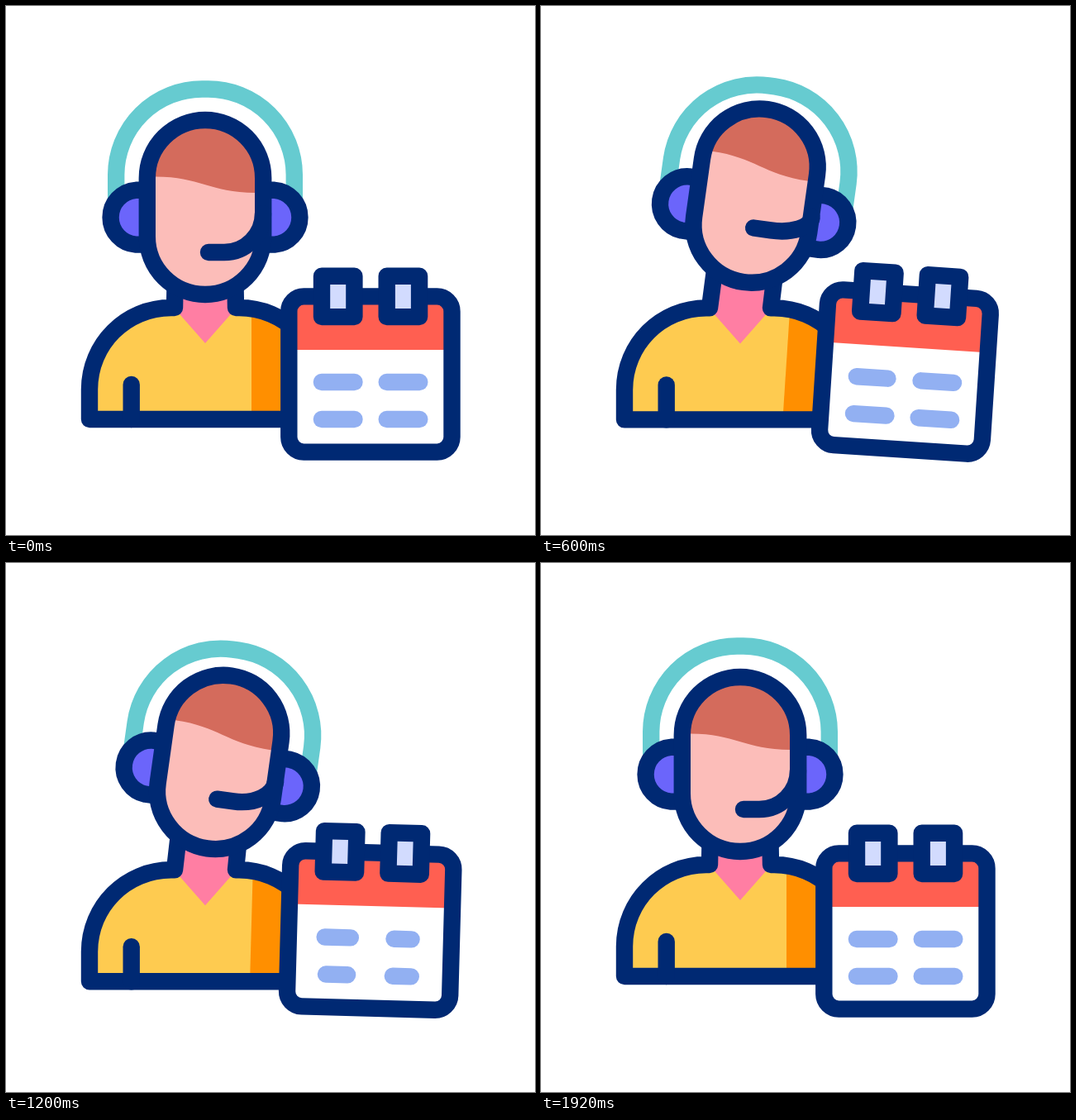
These frames come from a looping animation (640x640 px, 2000 ms). An HTML page with a canvas:

```html
<!DOCTYPE html>
<html lang="en">
<head>
<meta charset="utf-8">
<title>Support agent with calendar</title>
<style>
  html, body { margin: 0; width: 100%; height: 100%; overflow: hidden; background: #fff; }
  canvas { display: block; width: 100vw; height: 100vh; }
</style>
</head>
<body>
<canvas id="stage" width="640" height="640"></canvas>
<script>
const ctx = document.getElementById('stage').getContext('2d');
const LOOP = 2000, STEP = 40, LINE = 20.4, RAD = Math.PI / 180;
const NAVY = '#002973', TEAL = '#66cbd0', PURPLE = '#6b65fb', HAIR = '#d46b5c',
  SKIN = '#fcbdb9', PINK = '#ff7ea3', YELLOW = '#fecb50', ORANGE = '#ff8f00',
  RED = '#ff5f51', BLUE = '#92b0f2', PALE = '#d2dbfe';

// [time, value] keys
const BOB = [[40, 0], [400, 14.5], [760, -9.5], [1060, 14.5], [1410, -9.2], [1820, 0]];
const TILT = [[40, 0], [320, 8], [1440, 8], [1800, 0]];
const LOOK = [[320, 0], [610, 1], [680, 1], [960, 0], [1000, 0], [1340, 1], [1400, 1], [1760, 0]];
const HOP = [[480, 0], [880, -22.2], [1280, 0]];
const SWING = [[480, 0], [680, 5.7], [880, -6.3], [1080, 4.5], [1280, 0]];

// x, y, start time
const DASHES = [[401.7, 455, 520], [401.7, 500, 610], [480.5, 455, 745], [480.5, 500, 870]];

const sine = p => (1 - Math.cos(Math.PI * p)) / 2;
const strong = p => p < 0.5 ? 0.5 * (2 * p) ** 2.6 : 1 - 0.5 * (2 - 2 * p) ** 2.6;

function at(keys, t, ease = sine) {
  if (t <= keys[0][0]) return keys[0][1];
  for (let i = 1; i < keys.length; i++) {
    const [t0, v0] = keys[i - 1], [t1, v1] = keys[i];
    if (t < t1) return v0 + (v1 - v0) * ease((t - t0) / (t1 - t0));
  }
  return keys[keys.length - 1][1];
}

function fill(path, color) {
  ctx.fillStyle = color;
  ctx.fill(path);
}

function stroke(path, color = NAVY) {
  ctx.strokeStyle = color;
  ctx.stroke(path);
}

function box(x, y, w, h, r = 0) {
  const p = new Path2D();
  p.roundRect(x, y, w, h, r);
  return p;
}

function group(draw) {
  ctx.save();
  draw();
  ctx.restore();
}

function turn(x, y, deg) {
  ctx.translate(x, y);
  ctx.rotate(deg * RAD);
  ctx.translate(-x, -y);
}

const torso = new Path2D('M204 365H200C145 365 101 409 101 464V500H381V464C381 409 337 365 282 365H278Z');
const arm = new Path2D('M151.7 458V500');
const band = new Path2D('M133.2 240V204A104 104 0 0 1 237.2 100.5H244.8A104 104 0 0 1 348.8 204V240');
const earL = new Path2D('M175 222.8H157A33 33 0 0 0 157 288.6H175Z');
const earR = new Path2D('M307 222.8H325A33 33 0 0 1 325 288.6H307Z');
const face = box(170.8, 138, 140.4, 211, 70.2);
const hair = new Path2D('M150 100V206.5H181C235 206.5 245 225.5 302 226H335V100Z');
const sheet = box(342.3, 351.4, 197.2, 188.2, 18);

function neckTop(x, pose) {
  const a = pose.tilt * RAD, dx = x - 241, dy = -10;
  return [241 + dx * Math.cos(a) - dy * Math.sin(a) + 4 * pose.look,
          348 + dx * Math.sin(a) + dy * Math.cos(a) - 15.3 * pose.look];
}

function placeCalendar(pose) {
  ctx.translate(0, pose.hop);
  turn(441, 438, pose.swing);
}

function drawBody(pose) {
  group(() => {
    ctx.translate(0, pose.bob);
    fill(torso, YELLOW);
    // shadow keeps to the calendar while clipped by the torso
    group(() => {
      ctx.clip(torso);
      ctx.translate(0, -pose.bob);
      placeCalendar(pose);
      fill(box(297, 280, 160, 300), ORANGE);
    });
    const l = neckTop(204.5, pose), r = neckTop(277.5, pose);
    const skin = new Path2D(`M${l}L204 366L241 408L278 366L${r}Z`);
    fill(skin, PINK);
    stroke(new Path2D(`M${l}L204 365H200C145 365 101 409 101 464V500H381V464C381 409 337 365 282 365H278L${r}`));
    stroke(arm);
  });
}

function drawHead(pose) {
  const u = pose.look;
  group(() => {
    ctx.translate(3.8 * u, pose.bob - 6.4 * u);
    turn(241, 348, pose.tilt);
    stroke(band, TEAL);
    for (const ear of [earL, earR]) {
      fill(ear, PURPLE);
      stroke(ear);
    }
    group(() => {
      ctx.translate(-u, -9 * u);
      fill(face, SKIN);
      group(() => {
        ctx.clip(face);
        ctx.translate(0, -9 * u);
        fill(hair, HAIR);
      });
      stroke(face);
    });
    const drop = 47 - 24.6 * u;
    const mic = new Path2D();
    mic.moveTo(245 - 2 * u, 251 + drop);
    mic.lineTo(264, 251 + drop);
    mic.ellipse(264, 251, 47, drop, 0, Math.PI / 2, 0, true);
    stroke(mic);
  });
}

function drawCalendar(pose, t) {
  group(() => {
    placeCalendar(pose);
    fill(sheet, '#fff');
    fill(box(345, 355, 192, 61), RED);
    stroke(sheet);
    for (const x of [382, 460.7]) {
      const hook = box(x, 326.7, 39.4, 49.4);
      fill(hook, PALE);
      stroke(hook);
    }
    for (const [x, y, start] of DASHES) {
      const w = at([[start, 60], [start + 400, 41], [start + 920, 60]], t);
      fill(box(x - w / 2, y - 10.2, w, 20.4, 10.2), BLUE);
    }
  });
}

function render(t) {
  const pose = {
    bob: at(BOB, t),
    tilt: at(TILT, t),
    look: at(LOOK, t),
    hop: at(HOP, t, strong),
    swing: at(SWING, t)
  };
  ctx.fillStyle = '#fff';
  ctx.fillRect(0, 0, 640, 640);
  ctx.lineWidth = LINE;
  ctx.lineCap = ctx.lineJoin = 'round';
  drawBody(pose);
  drawHead(pose);
  drawCalendar(pose, t);
}

const begin = performance.now();
function tick() {
  const t = (performance.now() - begin) % LOOP;
  render(Math.floor(t / STEP) * STEP);
  requestAnimationFrame(tick);
}
tick();
</script>
</body>
</html>
```
